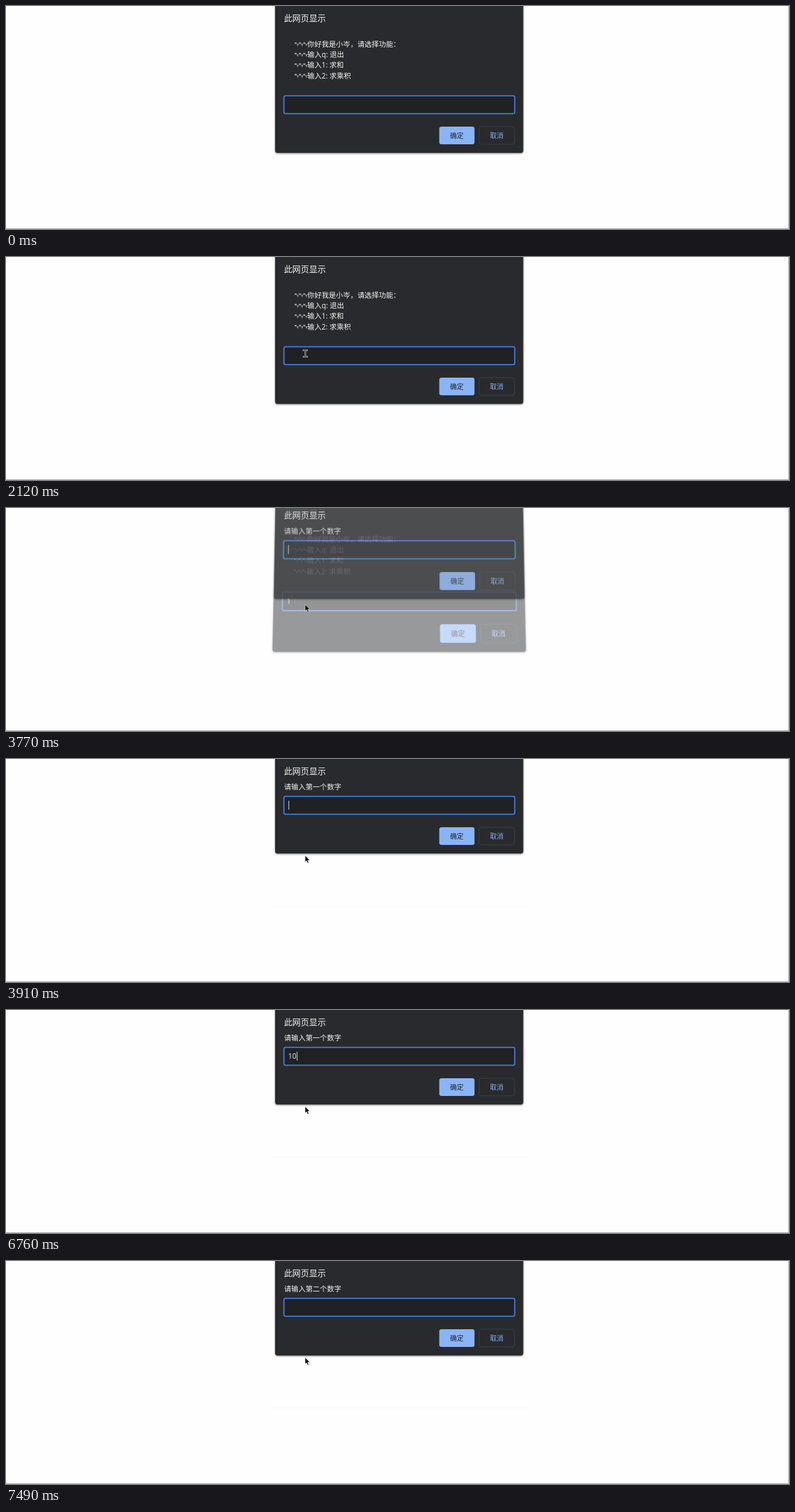
Recreate the animation shown at these times as an HTML page. Size 1280 px wide and 366 px high, loop 8 s.

```html
<!DOCTYPE html>
<html lang="zh-CN">
<head>
<meta charset="utf-8">
<title>Prompt dialogs</title>
<style>
  html, body { margin: 0; width: 100%; height: 100%; overflow: hidden; background: #fefefe; }
  svg {
    position: absolute; left: 0; top: 0; width: 1280px; height: 366px;
    overflow: visible; transform-origin: 0 0;
    font-family: "Open Sans", "Noto Sans CJK SC", "Noto Sans CJK", sans-serif;
  }
  .panel { fill: #292a2d; filter: drop-shadow(0 1px 1.6px rgba(0, 0, 0, .6)); }
  .field { fill: #202124; stroke: #4384ec; stroke-width: 1.8; }
  .tabs { fill: none; stroke: #eee; stroke-width: .8; }
</style>
</head>
<body>
<script>
const NS = "http://www.w3.org/2000/svg";
const LOOP = 8000, MID = 643;

function add(parent, tag, attrs = {}, text) {
  const el = document.createElementNS(NS, tag);
  for (const k in attrs) el.setAttribute(k, attrs[k]);
  if (text !== undefined) el.textContent = text;
  return parent.appendChild(el);
}

const layer = () => add(document.body, "svg", { viewBox: "0 0 1280 366" });

// Places a line of text by the vertical middle of its characters.
function label(svg, text, x, mid, size, fill = "#f4f4f4", anchor = "start") {
  return add(svg, "text", {
    x, y: mid + size * 0.37, "font-size": size, fill, "text-anchor": anchor
  }, text);
}

function button(svg, text, x, y, fill, stroke, color) {
  add(svg, "rect", { x, y, width: 57.6, height: 29, rx: 3.5, fill, stroke });
  label(svg, text, x + 28.8, y + 14.6, 11, color, "middle");
}

// The panel's lower part sits at a fixed distance from its bottom edge.
function dialog(bottom, drawMessage) {
  const svg = layer(), dy = bottom - 241;
  add(svg, "rect", { class: "panel", x: 440, y: -40, width: 405.5, height: bottom + 40, rx: 4 });
  label(svg, "此网页显示", 454.4, 20.2, 13.7);
  drawMessage(svg);
  add(svg, "rect", { class: "field", x: 454.4, y: 147.4 + dy, width: 377.3, height: 29.2, rx: 2.5 });
  button(svg, "确定", 708.3, 198 + dy, "#8ab4f8", "none", "#202124");
  button(svg, "取消", 773.5, 198 + dy, "none", "#3c4043", "#8ab4f8");
  const entry = label(svg, "", 461.3, 162 + dy, 11.7);
  const caret = add(svg, "rect", { y: 154.5 + dy, width: 1, height: 14.5, fill: "#e8e8e8" });
  return {
    show(text, caretOn, pose) {
      svg.style.display = "";
      entry.textContent = text;
      caret.setAttribute("x", text ? 462.2 + 6.6 * text.length : 461.8);
      caret.style.display = caretOn ? "" : "none";
      svg.style.opacity = pose ? pose.alpha : 1;
      svg.style.transform = pose ? tilt(pose) : "none";
    },
    hide() { svg.style.display = "none"; }
  };
}

// Perspective tilt: x scales by a/w about the middle, y maps to (c + d*y)/w, w = 1 - k*y.
function tilt({ a, k, c, d }) {
  return `matrix3d(${[a, 0, 0, 0, -MID * k, d, 0, -k, 0, 0, 1, 0, MID * (1 - a), c, 0, 1]})`;
}

function menu(svg) {
  ["你好我是小岑，请选择功能：", "输入q: 退出", "输入1: 求和", "输入2: 求乘积"].forEach((text, i) => {
    const mid = 62.6 + i * 17.25;
    for (let j = 0; j < 3; j++) {
      add(svg, "path", {
        class: "tabs",
        transform: `translate(${472.6 + j * 7} ${mid - 3})`,
        d: "M0 0v2.6M2 0v2.6M0 1.3h2M3 3.2h2.8M4.4 3.2v2.8"
      });
    }
    label(svg, text, 492.6, mid, 11.7);
  });
}

const ask = text => svg => label(svg, text, 454.6, 45.2, 11.7);

const page = layer();
const trace = add(page, "rect", { x: 434, y: 240, width: 419, height: 2, fill: "#fafafa" });
add(page, "path", { d: "M0 365.5H1279.5V0", fill: "none", stroke: "#a0a0a0" });

const dialogs = [
  dialog(241, menu),
  dialog(155, ask("请输入第一个数字")),
  dialog(155, ask("请输入第二个数字"))
];

const top_ = layer();
const click = add(top_, "circle", { cx: 489.5, cy: 158.5, r: 7.2, fill: "#ff0", "fill-opacity": .47 });
const beam = add(top_, "g", { fill: "none" });
const BEAM = "M-2.7-5.4H-.8L0-4.9L.8-5.4H2.7M0-4.9V4.9M-2.7 5.4H-.8L0 4.9L.8 5.4H2.7";
add(beam, "path", { d: BEAM, stroke: "#b4b4b4", "stroke-width": 2.6, "stroke-linecap": "square" });
add(beam, "path", { d: BEAM, stroke: "#202124", "stroke-width": 1 });
const arrow = add(top_, "path", {
  d: "M0 0V10.6L2.4 8.4L4.2 12.4L6 11.6L4.2 7.7H7.6Z",
  fill: "#000", stroke: "#fff", "stroke-width": .6
});

// time, dialog, typed text, caret visible
const typing = [
  [0, 0, "", 0], [490, 0, "", 1], [1020, 0, "", 0], [1550, 0, "", 1], [2120, 0, "", 0],
  [2660, 0, "1", 1], [3090, 0, "1", 0], [3640, 0, "1", 1],
  [3770, 1, "", 1], [4320, 1, "", 0], [4750, 1, "", 1], [5350, 1, "", 0],
  [5490, 1, "1", 1], [5610, 1, "10", 1], [6190, 1, "10", 0], [6760, 1, "10", 1],
  [7060, 2, "", 1], [7490, 2, "", 0]
];

// time, x, y, shape
const pointer = [
  [0, 0, 0, ""], [120, 513, 342, "arrow"], [250, 510, 302, "arrow"], [370, 505, 264, "arrow"],
  [490, 500, 228, "arrow"], [640, 483, 156, "beam"], [780, 483, 154, "beam"],
  [900, 484, 155, "beam"], [1020, 486, 156, "beam"], [1150, 488, 157, "beam"],
  [1270, 489.3, 158.4, "beam"], [3770, 489, 158.5, "arrow"]
];

// Dialog swaps: the old one tips away while the new one tips in.
const swaps = [
  {
    from: 3770, to: 3910, text: "1",
    leave: { a: .995, k: 1.096e-4, c: -12, d: 1.0032, alpha: .48 },
    enter: { a: .998, k: 7.35e-5, c: -8, d: 1.002, alpha: .7 }
  },
  {
    from: 7060, to: 7210, text: "10",
    leave: { a: .997, k: 8e-5, c: -13, d: 1.011, alpha: .25 },
    enter: { a: .999, k: 4.5e-5, c: -5, d: 1.0028, alpha: .73 }
  }
];

const at = (steps, t) => steps.findLast(s => s[0] <= t);
const toggle = (el, on) => { el.style.display = on ? "" : "none"; };

function render(t) {
  const [, current, text, caretOn] = at(typing, t);
  const swap = swaps.find(s => t >= s.from && t < s.to);
  dialogs.forEach((d, i) => {
    if (i === current) d.show(text, caretOn, swap && swap.enter);
    else if (swap && i === current - 1) d.show(swap.text, false, swap.leave);
    else d.hide();
  });
  toggle(trace, t >= 3910);

  const [, x, y, shape] = at(pointer, t);
  for (const [name, el] of [["beam", beam], ["arrow", arrow]]) {
    toggle(el, shape === name);
    el.setAttribute("transform", `translate(${x} ${y})`);
  }
  toggle(click, t >= 2260 && t < 2410);
}

const start = performance.now();
function tick() {
  render((performance.now() - start) % LOOP);
  requestAnimationFrame(tick);
}
tick();
</script>
</body>
</html>
```
